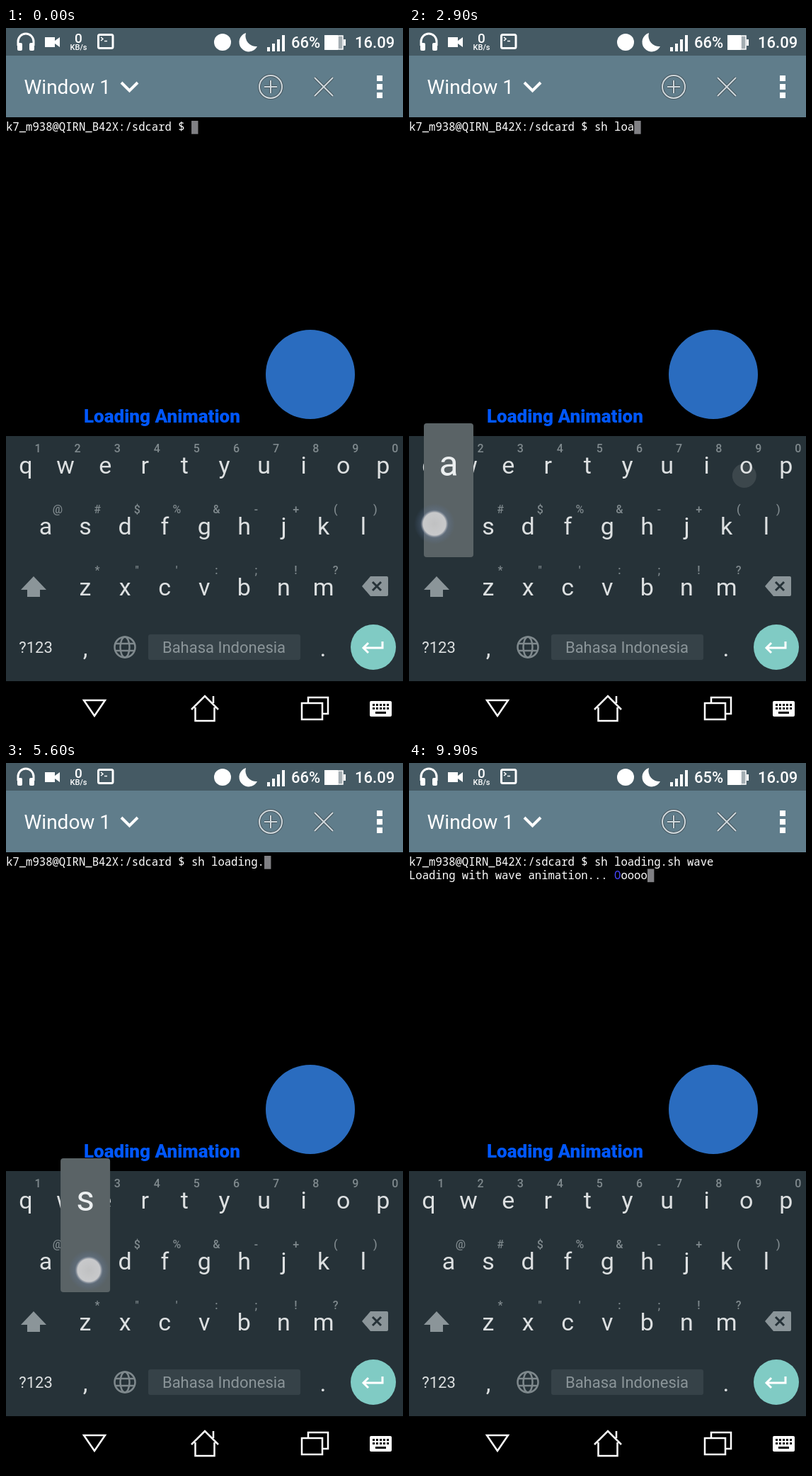
An HTML page for the animation above (10000 ms loop, 561 px wide and 998 px high).

```html
<!DOCTYPE html>
<html lang="en">
<head>
<meta charset="utf-8">
<title>Terminal loading animation</title>
<style>
  html, body { margin: 0; width: 100%; height: 100%; overflow: hidden; background: #000; }
  svg { display: block; width: 100%; height: 100%; font-family: Roboto, "Open Sans", sans-serif; }
  text { white-space: pre; }
  .term { font: 15.6px "Noto Sans Mono", "DejaVu Sans Mono", monospace; fill: #fff; }
  .key { font-size: 34px; fill: #dde0e1; text-anchor: middle; }
  .hint { font-size: 16px; font-weight: 500; fill: #7f898d; text-anchor: middle; }
  .small { font-size: 22px; fill: #dde0e1; text-anchor: middle; }
  .big { font-size: 50px; fill: #eceff0; text-anchor: middle; }
  .status { font-weight: 500; fill: #fff; }
  .line { fill: none; stroke: #fff; }
</style>
</head>
<body>
<svg viewBox="0 0 561 998" preserveAspectRatio="none">
  <defs>
    <radialGradient id="touch">
      <stop offset="0" stop-color="#c0c1c2"/>
      <stop offset=".5" stop-color="#c8c9cb"/>
      <stop offset=".55" stop-color="#a9afba" stop-opacity=".7"/>
      <stop offset=".62" stop-color="#6f86ad" stop-opacity=".25"/>
      <stop offset=".9" stop-color="#5a7ab5" stop-opacity="0"/>
    </radialGradient>
  </defs>

  <!-- status bar -->
  <rect width="561" height="39" fill="#455a64"/>
  <g fill="#fff">
    <path class="line" d="M17 25v-6a11 11 0 0 1 22 0v6" stroke-width="3"/>
    <rect x="16" y="21" width="7" height="11" rx="2"/>
    <rect x="33" y="21" width="7" height="11" rx="2"/>
    <path d="M55 13h14v5l7-5v14l-7-5v5h-14z"/>
    <rect class="line" x="130.500" y="9.500" width="20.500" height="19" rx="2" stroke-width="3"/>
    <path class="line" d="M134 13l3 2.500-3 2.500M139 18.500h4" stroke-width="1.500"/>
    <circle cx="306" cy="20" r="12"/>
    <path d="M339 7A13.500 13.500 0 1 0 355 26A15 15 0 0 1 339 7Z"/>
    <path d="M369 27h4v6h-4zM376 22h4v11h-4zM383 16h4v17h-4zM390 10h4v23h-4z"/>
    <rect x="450" y="10" width="19" height="21"/>
    <rect x="469" y="11" width="7" height="19" fill="#a3adb2" stroke="#fff" stroke-width="1.500"/>
    <rect x="477" y="16" width="3" height="9"/>
  </g>
  <g class="status">
    <text x="102.500" y="21" font-size="19" text-anchor="middle">0</text>
    <text x="102.500" y="31" font-size="11" text-anchor="middle">KB/s</text>
    <text id="battery" x="403" y="28" font-size="22"></text>
    <text x="493" y="28" font-size="22">16.09</text>
  </g>

  <!-- tool bar -->
  <rect y="39" width="561" height="87" fill="#607d8b"/>
  <text x="25.500" y="93" font-size="28" fill="#fff">Window 1</text>
  <path class="line" d="M163 77l11.500 11.500L186 77" stroke-width="4"/>
  <g id="tools" fill="none"></g>
  <path d="M524 67h8v8h-8zM524 79h8v8h-8zM524 91h8v8h-8z" fill="#fff"/>

  <!-- terminal -->
  <rect id="cursor" width="9.400" height="18.700" fill="#808084"/>
  <text id="command" class="term" x="0" y="145"></text>
  <text id="output" class="term" x="0" y="163.500"></text>
  <text x="110" y="557" font-size="26" font-weight="900" fill="#0057ff">Loading Animation</text>
  <circle cx="430" cy="489" r="63" fill="#2a6cbf"/>

  <!-- keyboard -->
  <rect y="576" width="561" height="346" fill="#263238"/>
  <g id="letters"></g>
  <g id="symbols"></g>
  <g fill="#8b9599">
    <path d="M503 788l12-14h23q2 0 2 2v24q0 2-2 2h-23z"/>
    <path d="M518 782l12 12M530 782l-12 12" stroke="#263238" stroke-width="3"/>
  </g>
  <circle cx="519" cy="874" r="32" fill="#80cbc4"/>
  <path class="line" d="M532 866v9h-27M512 868l-7 7 7 7" stroke-width="3"/>

  <!-- navigation bar -->
  <rect y="922" width="561" height="76"/>
  <g class="line" stroke-width="2.500">
    <path d="M110 949h30l-15 22z"/>
    <path d="M262 962l19-19 19 19M267.500 959v19h27v-19M293 943v10"/>
    <path d="M427 953v-8h28v23h-8"/>
    <rect x="418" y="953" width="29" height="23"/>
  </g>
  <rect x="514" y="950" width="31" height="22" rx="2" fill="#fff"/>
  <path d="M518 955.500h24M518 960.500h24" stroke="#000" stroke-width="3" stroke-dasharray="3 2"/>
  <path d="M522 966.500h15" stroke="#000" stroke-width="3"/>

  <g id="fingers"></g>
</svg>
<script>
const LOOP = 10000, STEP = 100;
const PITCH = 56.1, CELL = 9.36;
const PROMPT = "k7_m938@QIRN_B42X:/sdcard $ ";
const MESSAGE = "Loading with wave animation... ";

const el = id => document.getElementById(id);
const esc = s => s.replace(/&/g, "&amp;").replace(/</g, "&lt;");
const label = (cls, x, y, s) => `<text class="${cls}" x="${x}" y="${y}">${esc(s)}</text>`;
const box = (x, y, w, h, fill, r = 3) =>
  `<rect x="${x}" y="${y}" width="${w}" height="${h}" rx="${r}" fill="${fill}"/>`;

const rows = [
  { x: 28, y: 617, keys: "qwertyuiop", alt: "1234567890" },
  { x: 56, y: 703, keys: "asdfghjkl", alt: "@#$%&-+()" },
  { x: 112, y: 789, keys: "zxcvbnm", alt: "*\"':;!?" }
];
const place = { " ": [308, 874], ".": [448, 874], mode: [42, 874], del: [522, 788], enter: [519, 874] };

function buildKeys() {
  let letters = "", symbols = "";
  for (const row of rows) {
    [...row.keys].forEach((c, i) => {
      const x = row.x + i * PITCH;
      place[c] = [x, row.y];
      letters += label("key", x, row.y + 12, c) + label("hint", x + 17, row.y - 18, row.alt[i]);
      symbols += label("key", x, row.y + 12, row.alt[i]);
    });
  }
  const ends = label("key", 112, 887, ",") + label("key", 448, 887, ".");
  letters += ends + label("small", 42, 882, "?123")
    + `<path d="M39 774l18 19h-9v10h-18v-10h-9z" fill="#8b9599"/>`
    + `<g fill="none" stroke="#7f898d" stroke-width="2.5"><circle cx="168" cy="874" r="14.500"/>`
    + `<ellipse cx="168" cy="874" rx="6.500" ry="14.500"/><path d="M155 869h26M155 879h26"/></g>`
    + box(201, 856, 215, 36, "#364248")
    + `<text class="small" x="308" y="882" style="fill:#8b9599">Bahasa Indonesia</text>`;
  symbols += ends + `<text class="small" x="39" y="796" style="font-size:19px">= \\ &lt;</text>`
    + box(201, 856, 159, 36, "#364248")
    + label("key", 168, 887, "_") + label("key", 392, 887, "/")
    + `<g id="modeDown">${box(5, 842, 74, 64, "#3d494e")}</g>` + label("small", 42, 882, "ABC");
  el("letters").innerHTML = letters;
  el("symbols").innerHTML = symbols;

  const icons = "M365 83h18M374 74v18M358 83a16 16 0 1 1 32 0a16 16 0 1 1-32 0M436 70l26 26M462 70l-26 26";
  el("tools").innerHTML = `<path d="${icons}" stroke="#46565f" stroke-width="4"/>`
    + `<path d="${icons}" stroke="#cfd8dc" stroke-width="2"/>`;
}

// key, time down, time held, finger offset
const taps = [
  ["s", 100, 200, 4, 8], ["h", 300, 200, 3, 6], [" ", 600, 100, 10, 4],
  ["mode", 1000, 200, 22, 17], [".", 1200, 200, 4, 6], ["del", 1700, 200, -6, 4],
  ["l", 2500, 200, 4, 6], ["o", 2700, 200, -3, 15], ["a", 2800, 200, -20, -3],
  ["d", 3100, 200, 3, 6], ["i", 3300, 200, 4, 8], ["n", 3600, 200, 3, 6], ["g", 3800, 100, 4, 5],
  [".", 4400, 100, 4, 6],
  ["s", 5600, 200, 5, 13], ["h", 5700, 200, 3, 6], [" ", 5800, 100, 10, 4], ["w", 5900, 200, 4, 8],
  ["a", 6000, 200, -8, 4], ["v", 6100, 100, 3, 6], ["e", 6200, 100, 4, 8],
  ["enter", 7400, 200, 2, 3]
];

function typed(t) {
  let s = "";
  for (const [key, down] of taps) {
    if (t < down + 100) break;
    if (key === "del") s = s.slice(0, -1);
    else if (key.length === 1) s += key;
  }
  return s;
}

function fingers(t) {
  let popups = "", dots = "";
  for (const [key, down, hold, dx, dy] of taps) {
    const age = t - down;
    if (age < 0 || age >= hold + 100) continue;
    const [x, y] = place[key], held = age < hold;
    if (held && key.length === 1 && key !== " ")
      popups += box(x - 35, y - 145, 70, 189, "#5a6366", 4) + label("big", x, y - 71, key);
    dots += held
      ? `<circle cx="${x + dx}" cy="${y + dy}" r="32" fill="url(#touch)"/>`
      : `<circle cx="${x + dx}" cy="${y + dy}" r="17" fill="#fff" opacity=".1"/>`;
  }
  return popups + dots;
}

function wave(t) {
  if (t < 7800) return "";
  const at = Math.floor((t - 7800) / 200) % 5;
  return "o".repeat(at) + '<tspan fill="#4646ff">O</tspan>' + "o".repeat(4 - at);
}

function draw(t) {
  const command = PROMPT + typed(t), running = t >= 7600;
  el("command").textContent = command;
  el("output").innerHTML = running ? MESSAGE + wave(t) : "";
  const cells = running ? MESSAGE.length + (t < 7800 ? 0 : 5) : command.length;
  el("cursor").setAttribute("x", cells * CELL);
  el("cursor").setAttribute("y", running ? 149.5 : 131);
  el("battery").textContent = t < 9900 ? "66%" : "65%";
  const alt = t >= 1000 && t < 1500;
  el("letters").style.display = alt ? "none" : "";
  el("symbols").style.display = alt ? "" : "none";
  el("modeDown").style.display = t < 1200 ? "" : "none";
  el("fingers").innerHTML = fingers(t);
}

let start = null, last = -1;
function tick(now) {
  if (start === null) start = now;
  const t = Math.floor(((now - start) % LOOP) / STEP) * STEP;
  if (t !== last) draw(last = t);
  requestAnimationFrame(tick);
}
buildKeys();
draw(0);
requestAnimationFrame(tick);
</script>
</body>
</html>
```
